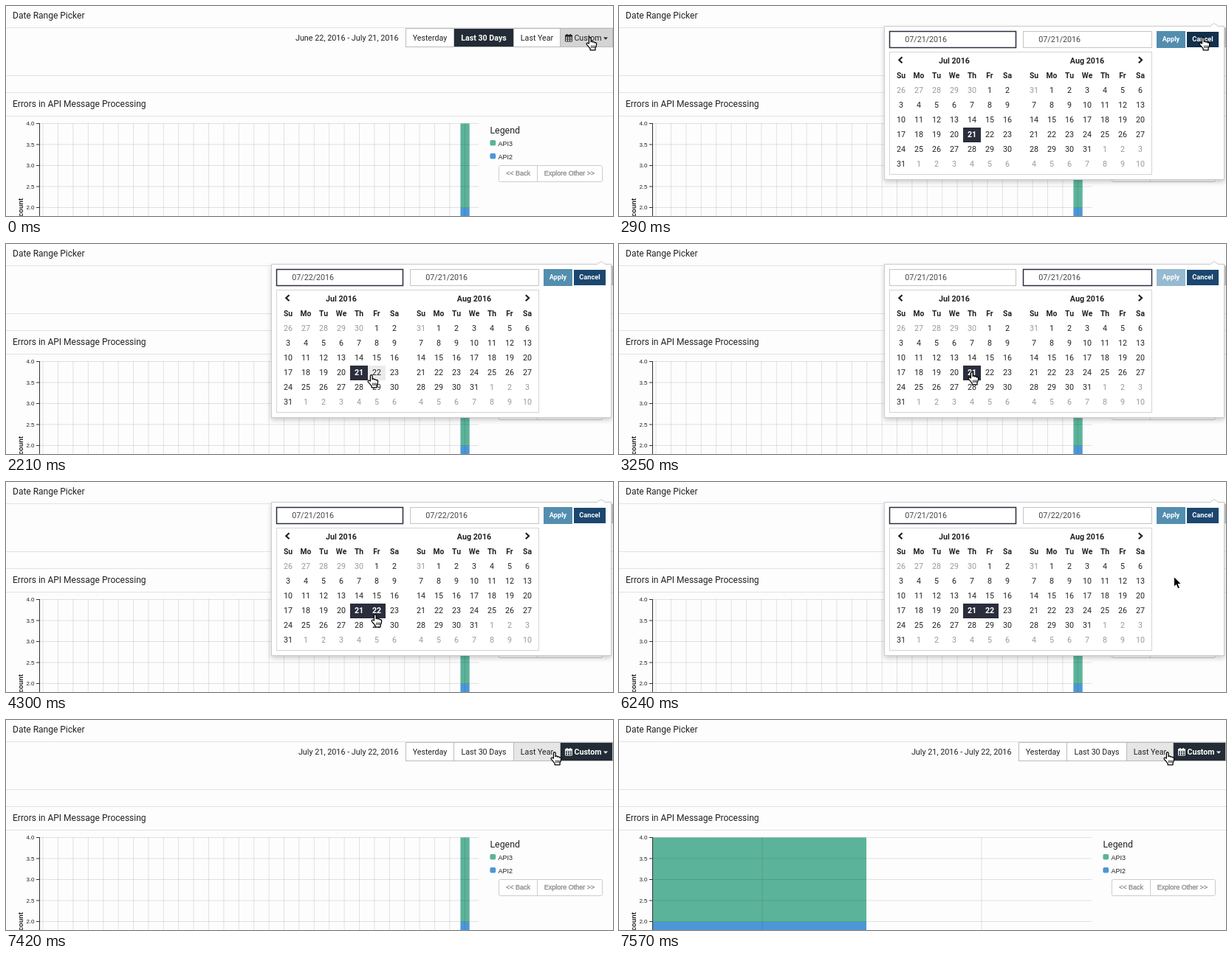
These frames come from a looping animation (822 by 285 pixels, 8000 ms). An HTML page:

```html
<!DOCTYPE html>
<html lang="en">
<head>
<meta charset="utf-8">
<title>Date Range Picker</title>
<style>
html, body { margin: 0; width: 100%; height: 100%; overflow: hidden; background: #fdfdfd; }
svg { display: block; width: 822px; height: 285px; font: 10.67px Roboto, sans-serif; fill: #222; }
.b { font-weight: 700; }
.arial { font-family: "Liberation Sans", Arial, sans-serif; }
.mid { text-anchor: middle; }
.end { text-anchor: end; }
</style>
</head>
<body>
<svg id="stage" viewBox="0 0 822 285"></svg>
<script>
const LOOP = 8000;
const DARK = '#232c36', GREEN = '#5bb39a', BLUE = '#4c97d6';
const stage = document.getElementById('stage');
const $ = id => document.getElementById(id);

const rect = (x, y, w, h, attrs = '') => `<rect x="${x}" y="${y}" width="${w}" height="${h}" ${attrs}/>`;
const text = (x, y, s, attrs = '') => `<text x="${x}" y="${y}" ${attrs}>${s}</text>`;
const path = (d, attrs = '') => `<path d="${d}" ${attrs}/>`;
const range = (n, f) => Array.from({ length: n }, (_, i) => f(i)).join('');

// Times at which the pointer jumps: [ms, x, y, shape]
const HAND = 'hand', ARROW = 'arrow';
const pointer = [
  [0, 786, 43, HAND], [880, 774, 58, ARROW], [1030, 738, 78, ARROW], [1170, 685, 107, HAND],
  [1320, 627, 136, HAND], [1470, 562, 156, HAND], [1620, 499, 170, HAND],
  [1920, 498, 172, HAND], [2070, 495, 176, HAND], [2210, 490, 178, HAND],
  [2360, 483, 178, HAND], [2500, 477, 176, HAND], [2650, 473, 174, HAND],
  [3550, 479, 177, HAND], [3700, 487, 179, HAND], [3850, 493, 180, HAND], [4000, 495, 180, HAND],
  [4750, 515, 195, HAND], [4890, 0, 0, ''],
  [6240, 751, 128, ARROW], [6390, 750, 104, ARROW], [6530, 746, 76, ARROW],
  [6680, 740, 51, HAND], [6830, 738, 44, HAND]
];

const months = [
  { name: 'Jul 2016', x: 370, lead: 5, before: 30, days: 31, month: 7 },
  { name: 'Aug 2016', x: 550, lead: 1, before: 31, days: 31, month: 8 }
];

function dayAt(m, i) {
  const n = i - m.lead + 1;
  if (n < 1) return { day: n + m.before, month: m.month - 1, off: true };
  if (n > m.days) return { day: n - m.days, month: m.month + 1, off: true };
  return { day: n, month: m.month, off: false };
}

function cellUnder(x, y) {
  const k = months.findIndex(m => x >= m.x && x < m.x + 168);
  if (k < 0 || y < 105 || y >= 225) return null;
  const i = Math.floor((y - 105) / 20) * 7 + Math.floor((x - months[k].x) / 24);
  return { k, i, ...dayAt(months[k], i) };
}

const dateText = d => `${String(d.month).padStart(2, '0')}/${String(d.day).padStart(2, '0')}/2016`;

function chart() {
  const ys = [0, 1, 2, 3, 4].map(i => 159.5 + i * 28.5);
  const grid = d => path(d, 'stroke="#000" stroke-opacity=".11"');
  const bars = (x, w) => rect(x, 159.5, w, 114.5, `fill="${GREEN}"`) + rect(x, 274, w, 11, `fill="${BLUE}"`);
  // Each gridline stands a quarter day after the day's bar begins.
  const ticks = (n, first, step) => grid(range(n, i => `M${first + step * i} 159V285`));
  return `<g id="monthBars">${bars(615.4, 12.3)}${ticks(29, 50.1, 20.4)}</g>
    <g id="dayBars">${bars(45, 290)}${ticks(2, 194, 297)}</g>`
    + grid(ys.map(y => `M45 ${y}H640`).join(''))
    + path('M45.5 159V285' + ys.map(y => `M41 ${y}H45`).join(''), 'stroke="#333" fill="none"')
    + ys.map((y, i) => text(38.5, y + 2.8, (4 - i / 2).toFixed(1), 'class="arial end" font-size="8"')).join('')
    + text(0, 0, 'count', 'class="arial b end" font-size="9.2" transform="translate(22.5 261) rotate(-90)"');
}

function legend() {
  const item = (y, c, s) => rect(655.4, y, 7.8, 7.5, `rx="2" fill="${c}"`) + text(666.5, y + 8, s, 'class="arial" font-size="9"');
  const grey = 'class="arial mid" font-size="9" fill="#8a8a8a" stroke="#8a8a8a" stroke-width=".3"';
  return text(655.4, 173, 'Legend', 'font-size="12.4"') + item(182, GREEN, 'API3') + item(200, BLUE, 'API2')
    + rect(667.5, 216.5, 140, 22, 'rx="2" fill="#fff" stroke="#ccc"') + path('M719.5 217V238', 'stroke="#ccc"')
    + text(693.5, 230.3, '&lt;&lt; Back', grey) + text(763, 230.3, 'Explore Other &gt;&gt;', grey);
}

function toolbar() {
  const button = (id, x, w, s, tx) => `<g id="${id}">${rect(x + .5, 30.5, w, 25, 'fill="#fff" stroke="#bbb"')}${text(tx, 47, s, 'class="mid"')}</g>`;
  return text(531.5, 47, '', 'id="period" class="end" font-size="10.82"')
    + button('yesterday', 541, 65, 'Yesterday', 574)
    + button('last30', 606, 81, 'Last 30 Days', 647)
    + button('lastYear', 687, 63, 'Last Year', 719)
    + button('custom', 750, 71, 'Custom', 788)
    + `<g id="customIcon">${path('M757.5 39.5H766.5V48H757.5ZM757.5 42H766.5M760.5 42V48M763.5 42V48M757.5 45H766.5', 'fill="none" stroke="currentColor" stroke-width=".9"')}
       ${path('M757.5 39.5H766.5V41.5H757.5ZM759 38H760.5V40H759ZM763.5 38H765V40H763.5Z', 'fill="currentColor"')}
       ${path('M809 42.5H815L812 45.7Z', 'fill="currentColor"')}</g>`;
}

function calendar(m, k) {
  const mid = c => m.x + 12 + c * 24;
  return text(mid(3), 78, m.name, 'class="b mid"')
    + ['Su', 'Mo', 'Tu', 'We', 'Th', 'Fr', 'Sa'].map((d, c) => text(mid(c), 98, d, 'class="b mid" font-size="10.3"')).join('')
    + range(42, i => {
      const d = dayAt(m, i), c = i % 7, r = Math.floor(i / 7);
      return `<g id="c${k}-${i}">${rect(m.x + c * 24, 105 + r * 20, 24, 20, 'fill="none"')}`
        + text(mid(c), 118 + r * 20, d.day, `class="mid" fill="${d.off ? '#999' : '#222'}"`) + '</g>';
    });
}

function popup() {
  const field = (id, x, w) => rect(x + .5, 34.5, w, 22, `id="${id}Box" fill="#fff"`) + text(x + 21.3, 49, '', `id="${id}" fill="#444"`);
  const white = 'class="b mid" font-size="9.2" fill="#fff"';
  return `<g id="popup">`
    + rect(359.5, 27.5, 460, 208, 'fill="#fff" stroke="#ccc" filter="url(#shadow)"')
    + path('M800 27.9L806 23.5L812 27.9', 'fill="#fff" stroke="#ccc"')
    + field('from', 366, 171) + field('to', 547, 174)
    + rect(728, 34, 39, 23, 'id="apply"') + text(747.5, 48.3, 'Apply', white)
    + rect(769, 35, 43, 21, 'id="cancel"') + text(790.5, 48.3, 'Cancel', white)
    + rect(366.5, 62.5, 355, 166, 'fill="#fff" stroke="#d4d4d4"')
    + path('M383.5 69.2L379.3 73.2L383.5 77.2M703.8 69.2L708 73.2L703.8 77.2', 'fill="none" stroke="#222" stroke-width="2.2"')
    + months.map(calendar).join('') + '</g>';
}

function cursors() {
  const hand = path('M4 8.6V2.2Q4 .6 5.3 .6Q6.6 .6 6.6 2.2V6.3Q7 5.4 8 5.6Q9 5.8 9.1 6.7Q9.8 6 10.7 6.4Q11.5 6.8 11.5 7.5Q12.3 7 13.1 7.5Q13.9 8 13.8 9.4Q13.7 12.3 12.3 14.3V17H5.6V15.2Q4.2 13.3 2.9 11.8L.9 9.6Q.4 8.6 1.3 8Q2.3 7.5 3.2 8.2Z',
    'fill="#fff" stroke="#000" stroke-width="1.2" stroke-linejoin="round"')
    + path('M7.2 11V14.5M9.2 11V14.5M11.1 11V14.5', 'stroke="#000" stroke-width=".9"');
  const arrow = path('M.5 .5V14.3L3.6 11.4L5.8 16.8L8.4 15.7L6.2 10.5H10.6Z', 'fill="#000" stroke="#fff"');
  return `<g id="hand"><g transform="translate(-.7 -.9) scale(1.04)">${hand}</g></g><g id="arrow">${arrow}</g>`;
}

stage.innerHTML = `<defs><filter id="shadow" x="-5%" y="-10%" width="110%" height="120%">
  <feDropShadow dx="0" dy="3" stdDeviation="3" flood-opacity=".2"/></filter></defs>`
  + rect(0, 0, 822, 285, 'fill="#fdfdfd"')
  + path('M0 29.5H822M0 94.5H822M0 117.5H822M0 149.5H822', 'stroke="#e2e2e2"')
  + text(9, 17, 'Date Range Picker', 'font-size="12"')
  + text(9, 137, 'Errors in API Message Processing', 'font-size="12"')
  + chart() + legend() + toolbar() + popup() + cursors();

const show = (id, on) => $(id).setAttribute('display', on ? 'inline' : 'none');
const fill = (id, c) => $(id).setAttribute('fill', c);

function paintButton(id, active, bg) {
  const [box, label] = $(id).children;
  box.setAttribute('fill', active ? DARK : bg);
  label.setAttribute('fill', active ? '#fff' : '#222');
  label.setAttribute('class', active ? 'b mid' : 'mid');
}

function focusField(id, on) {
  $(id + 'Box').setAttribute('stroke', on ? '#2a2d3e' : '#c4c4c4');
  $(id + 'Box').setAttribute('stroke-width', on ? 1.5 : 1);
}

function paintCell(k, i, bg, selected) {
  const [box, label] = $(`c${k}-${i}`).children;
  box.setAttribute('fill', bg);
  label.setAttribute('fill', selected ? '#fff' : dayAt(months[k], i).off ? '#999' : '#222');
  label.setAttribute('class', selected ? 'b mid' : 'mid');
}

function render(t) {
  const open = t >= 140 && t < 7130;
  const picked = t >= 7130;
  const choosingEnd = t >= 3250 && t < 4300;
  const ranged = t >= 4300;
  const justPicked = ranged && t < 4750;
  const [, x, y, shape] = pointer.filter(p => p[0] <= t).pop();
  const hover = shape === HAND ? cellUnder(x + 5, y + 1) : null;

  show('popup', open);
  show('monthBars', t < 7570);
  show('dayBars', t >= 7570);
  $('period').textContent = picked ? 'July 21, 2016 - July 22, 2016' : 'June 22, 2016 - July 21, 2016';
  paintButton('last30', !picked, '#fff');
  paintButton('lastYear', false, picked ? '#e6e6e6' : '#fff');
  paintButton('custom', picked, '#d4d4d4');
  $('customIcon').style.color = picked ? '#fff' : '#222';

  const start = { month: 7, day: 21 }, end = { month: 7, day: ranged ? 22 : 21 };
  $('from').textContent = dateText(hover && !choosingEnd && !justPicked ? hover : start);
  $('to').textContent = dateText(hover && choosingEnd ? hover : end);
  focusField('from', !choosingEnd);
  focusField('to', choosingEnd);
  fill('apply', choosingEnd ? '#96bacf' : '#538eaf');
  fill('cancel', t >= 290 && t < 880 ? '#12304c' : '#1b476f');

  months.forEach((m, k) => {
    for (let i = 0; i < 42; i++) {
      const d = dayAt(m, i);
      const selected = !d.off && d.month === 7 && d.day >= start.day && d.day <= end.day;
      const hot = hover && hover.k === k && hover.i === i;
      paintCell(k, i, selected ? '#2a2d3c' : hot ? '#ebebeb' : 'none', selected);
    }
  });

  for (const id of [HAND, ARROW]) {
    show(id, shape === id);
    $(id).setAttribute('transform', `translate(${x} ${y})`);
  }
}

function tick() {
  render(performance.now() % LOOP);
  requestAnimationFrame(tick);
}
tick();
</script>
</body>
</html>
```
